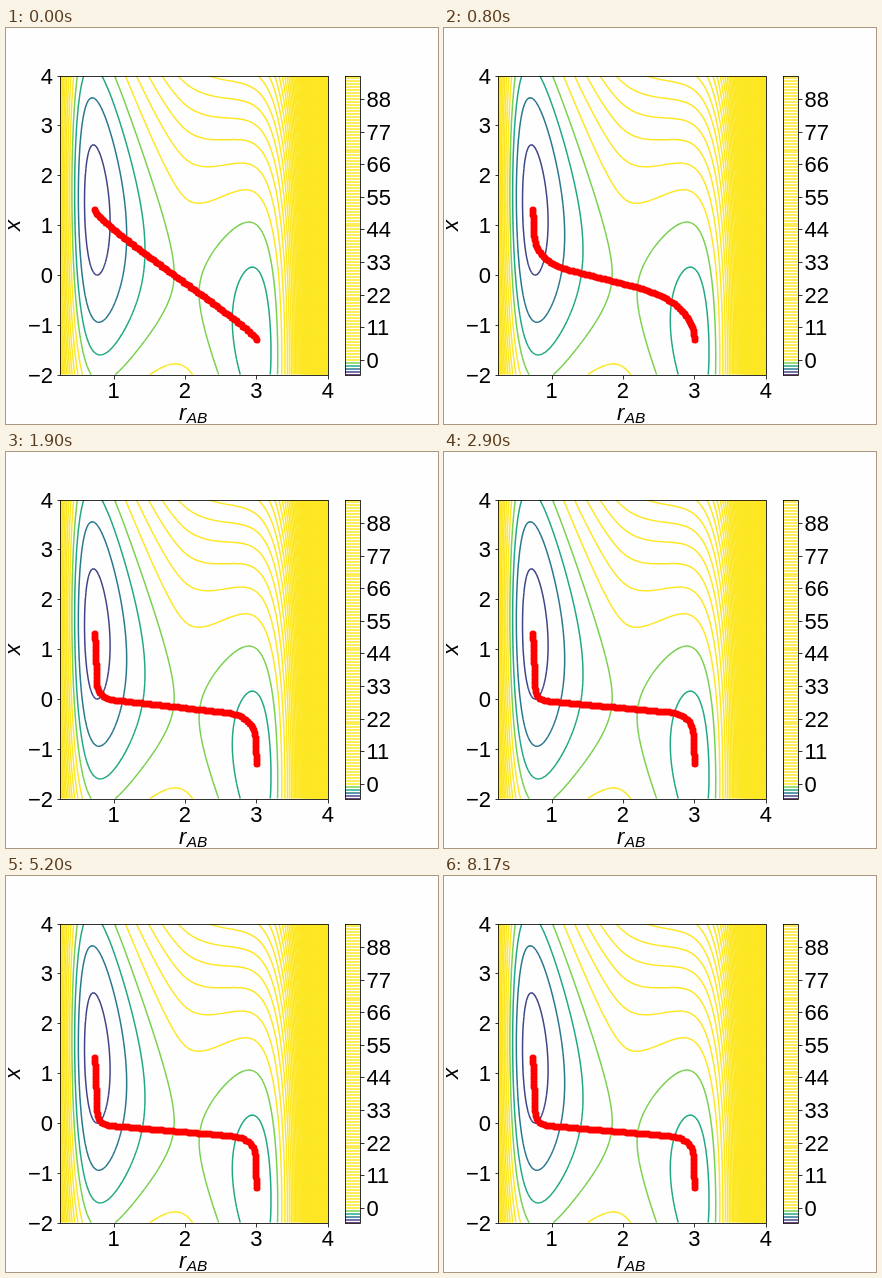
An HTML page with a canvas that plays this animation: 432x396 px, repeating every 8.27 s.

```html
<!DOCTYPE html>
<html lang="en">
<head>
<meta charset="utf-8">
<title>Path relaxation on a potential surface</title>
<style>
  html, body { margin: 0; width: 100%; height: 100%; overflow: hidden; background: #fefefe; }
  canvas, svg { position: absolute; left: 0; top: 0; width: 432px; height: 396px; }
  text { font: 22px "Liberation Sans", Arial, sans-serif; fill: #000; }
  .math { font-style: italic; }
  .sub { font-size: 15.4px; }
</style>
</head>
<body>
<canvas id="plot" width="432" height="396"></canvas>
<svg id="labels" viewBox="0 0 432 396">
  <text class="math" text-anchor="middle" transform="translate(13.5 197.5) rotate(-90)">x</text>
  <text class="math" x="173" y="392">r<tspan class="sub" dx="0.5" dy="3.4">AB</tspan></text>
</svg>
<canvas id="path" width="432" height="396"></canvas>
<script>
const LOOP = 8270, STEP = 100;
const AXES = { left: 54, right: 321.84, top: 47.52, bottom: 346.5 };
const BAR = { left: 338.58, right: 353.53 };
const R = [0.25, 4], X = [-2, 4], LEVELS = [-5, 96];
const COLORS = ['#440154', '#414487', '#2a788e', '#22a884', '#7ad151', '#fde725'];

const lerp = (a, b, w) => a + (b - a) * w;
const scale = ([d0, d1], p0, p1) => v => lerp(p0, p1, (v - d0) / (d1 - d0));
const px = scale(R, AXES.left, AXES.right);
const py = scale(X, AXES.bottom, AXES.top);
const barY = scale(LEVELS, AXES.bottom, AXES.top);
const color = level => COLORS[Math.min(level - LEVELS[0], 5)];
const snap = v => Math.round(v) + 0.5;

// LEPS potential for three collinear atoms plus a coupled oscillator.
function bond(r, depth, overlap) {
  const e = Math.exp(-1.942 * (r - 0.742));
  return {
    q: depth / 2 * (1.5 * e * e - e) / (1 + overlap),
    j: depth / 4 * (e * e - 6 * e) / (1 + overlap)
  };
}

function energy(r, x) {
  const span = 3.742;
  const a = bond(r, 4.746, 0.05), b = bond(span - r, 4.746, 0.8), c = bond(span, 3.445, 0.05);
  const exchange = a.j ** 2 + b.j ** 2 + c.j ** 2 - a.j * b.j - b.j * c.j - a.j * c.j;
  const stretch = r - (span / 2 - x / 1.154);
  return a.q + b.q + c.q - Math.sqrt(Math.max(0, exchange)) + 0.405 * stretch ** 2;
}

// Marching squares over an n by n grid, one path per energy level.
function contourPaths(n = 160) {
  const paths = new Map();
  const grid = Array.from({ length: n + 1 }, (_, i) => Array.from({ length: n + 1 }, (_, k) => {
    const r = lerp(...R, i / n), x = lerp(...X, k / n);
    return { x: px(r), y: py(x), v: energy(r, x) };
  }));
  for (let i = 0; i < n; i++) for (let k = 0; k < n; k++) {
    const cell = [grid[i][k], grid[i + 1][k], grid[i + 1][k + 1], grid[i][k + 1]];
    const values = cell.map(p => p.v);
    const last = Math.min(LEVELS[1], Math.floor(Math.max(...values)));
    for (let level = Math.ceil(Math.min(...values)); level <= last; level++) {
      const cuts = [];
      cell.forEach((p, m) => {
        const q = cell[(m + 1) % 4];
        if ((p.v < level) === (q.v < level)) return;
        const w = (level - p.v) / (q.v - p.v);
        cuts.push([lerp(p.x, q.x, w), lerp(p.y, q.y, w)]);
      });
      if (!paths.has(level)) paths.set(level, new Path2D());
      const path = paths.get(level);
      for (let m = 0; m + 1 < cuts.length; m += 2) {
        path.moveTo(...cuts[m]);
        path.lineTo(...cuts[m + 1]);
      }
    }
  }
  return paths;
}

function label(text, x, y, anchor) {
  const node = document.createElementNS('http://www.w3.org/2000/svg', 'text');
  node.setAttribute('x', x);
  node.setAttribute('y', Math.round(y));
  node.setAttribute('text-anchor', anchor);
  node.textContent = String(text).replace('-', '\u2212');
  document.getElementById('labels').append(node);
}

function drawPlot(ctx) {
  const { left, right, top, bottom } = AXES;
  const line = (x0, y0, x1, y1) => {
    ctx.beginPath();
    ctx.moveTo(x0, y0);
    ctx.lineTo(x1, y1);
    ctx.stroke();
  };
  const clipped = (x0, x1, draw) => {
    ctx.save();
    ctx.beginPath();
    ctx.rect(Math.round(x0), Math.round(top), Math.round(x1) - Math.round(x0), Math.round(bottom) - Math.round(top));
    ctx.clip();
    ctx.lineWidth = 1.5;
    draw();
    ctx.restore();
  };
  clipped(left, right, () => {
    for (const [level, path] of contourPaths()) {
      ctx.strokeStyle = color(level);
      ctx.stroke(path);
    }
  });
  clipped(BAR.left, BAR.right, () => {
    for (let level = LEVELS[0]; level <= LEVELS[1]; level++) {
      const y = Math.round(barY(level));
      ctx.strokeStyle = color(level);
      line(BAR.left, y, BAR.right + 1, y);
    }
  });

  ctx.strokeStyle = '#000';
  ctx.lineWidth = 0.8;
  for (const [x0, x1] of [[left, right], [BAR.left, BAR.right]])
    ctx.strokeRect(snap(x0), snap(top), snap(x1) - snap(x0), snap(bottom) - snap(top));
  for (let r = 1; r <= 4; r++) {
    line(snap(px(r)), snap(bottom), snap(px(r)), snap(bottom) + 4);
    label(r, px(r), 370, 'middle');
  }
  for (let x = -2; x <= 4; x++) {
    line(snap(left) - 3, snap(py(x)), snap(left), snap(py(x)));
    label(x, 47, py(x) + 8, 'end');
  }
  for (let v = 0; v <= 88; v += 11) {
    line(snap(BAR.right), snap(barY(v)), snap(BAR.right) + 4, snap(barY(v)));
    label(v, 360.5, barY(v) + 8, 'start');
  }
}

// The path runs down a steep wall from each minimum into a shared middle line.
// That line flattens about the pivot while its rounded corners tighten.
const START = [px(0.744), py(1.302)], END = [px(3.006), py(-1.305)];
const PIVOT = [px(2.028), py(-0.194)];
const RELAX = 605, LEAN = 0.04, MARKERS = 100;

function halfPath(end, slope, reach, samples = 60) {
  // Where the wall x = end.x + LEAN * dy meets the middle line.
  const dy = (PIVOT[1] + slope * (end[0] - PIVOT[0]) - end[1]) / (1 - slope * LEAN);
  const corner = [end[0] + LEAN * dy, end[1] + dy];
  const toward = (target, distance) => {
    const length = Math.hypot(target[0] - corner[0], target[1] - corner[1]);
    return corner.map((c, k) => lerp(c, target[k], Math.min(1, distance / length)));
  };
  const from = toward(end, reach), to = toward(PIVOT, 1.3 * reach);
  const bend = Array.from({ length: samples + 1 }, (_, i) => {
    const w = i / samples;
    return corner.map((c, k) => lerp(lerp(from[k], c, w), lerp(c, to[k], w), w));
  });
  return [end, ...bend, PIVOT];
}

function curveAt(time) {
  const rest = Math.exp(-time / RELAX);
  const slope = lerp(0.085, 0.72, rest), reach = 11 + 65 * rest;
  return [...halfPath(START, slope, reach), ...halfPath(END, slope, 1.7 * reach).reverse()];
}

function evenly(curve, count) {
  const lengths = [0];
  for (let i = 1; i < curve.length; i++)
    lengths.push(lengths[i - 1] + Math.hypot(curve[i][0] - curve[i - 1][0], curve[i][1] - curve[i - 1][1]));
  const total = lengths[lengths.length - 1];
  let seg = 0;
  return Array.from({ length: count }, (_, i) => {
    const s = total * i / (count - 1);
    while (seg < curve.length - 2 && lengths[seg + 1] < s) seg++;
    const w = (s - lengths[seg]) / (lengths[seg + 1] - lengths[seg] || 1);
    return [0, 1].map(k => lerp(curve[seg][k], curve[seg + 1][k], w));
  });
}

const pathCtx = document.getElementById('path').getContext('2d');
pathCtx.fillStyle = '#f00';
function drawPath(time) {
  pathCtx.clearRect(0, 0, 432, 396);
  pathCtx.beginPath();
  for (const point of evenly(curveAt(time), MARKERS)) {
    const [x, y] = point.map(Math.round);
    pathCtx.moveTo(x + 3.5, y);
    pathCtx.arc(x, y, 3.5, 0, 2 * Math.PI);
  }
  pathCtx.fill();
}

drawPlot(document.getElementById('plot').getContext('2d'));
const began = performance.now();
function tick() {
  const t = Math.max(0, performance.now() - began) % LOOP;
  drawPath(Math.floor(t / STEP) * STEP);
  requestAnimationFrame(tick);
}
tick();
</script>
</body>
</html>
```
